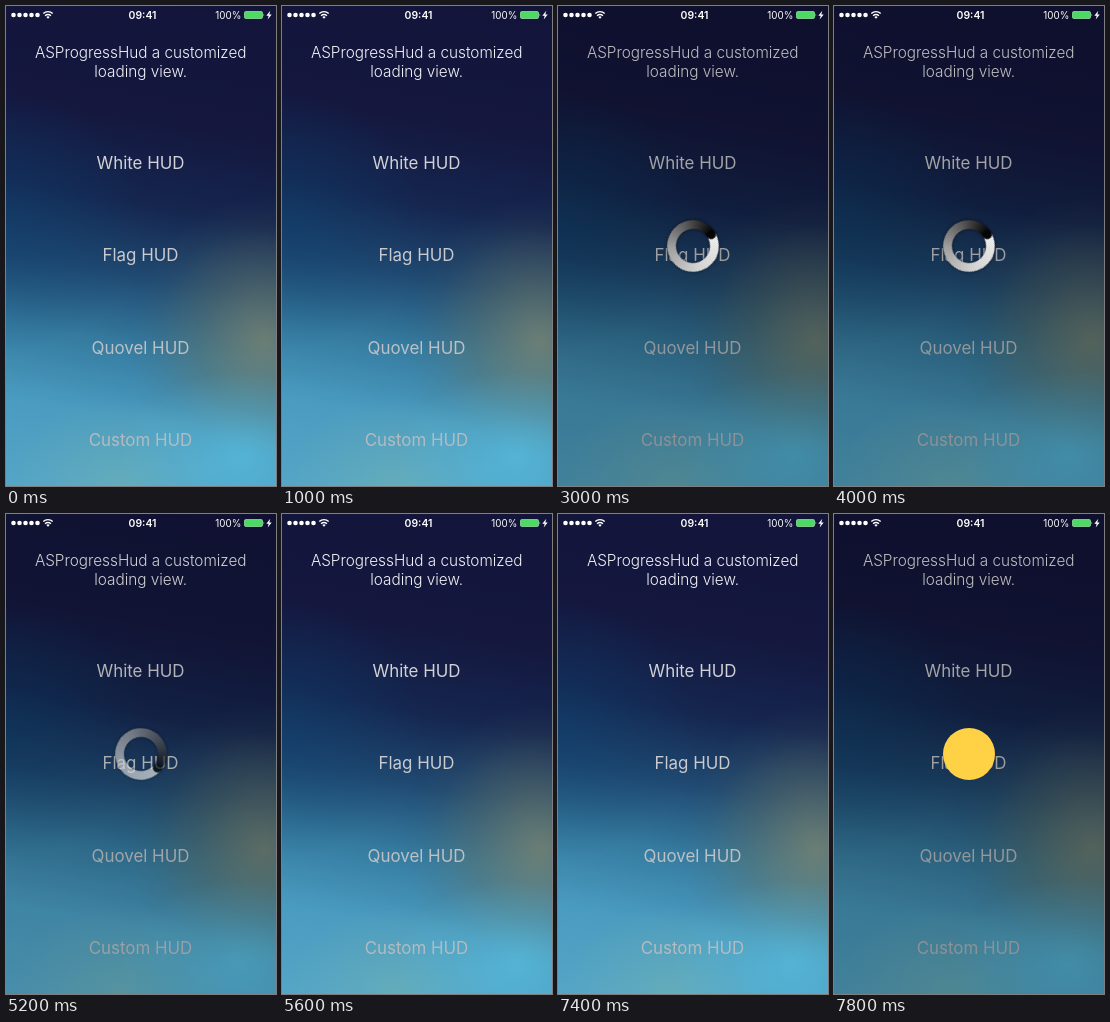
Animation of 270 by 480 pixels, one loop 8 s. Source, as an HTML page:

```html
<!DOCTYPE html>
<html lang="en">
<head>
<meta charset="utf-8">
<style>
  html, body { margin: 0; width: 270px; height: 480px; overflow: hidden; }
  body {
    position: relative;
    font-family: Inter, Roboto, sans-serif;
    background:
      radial-gradient(120px 85px at 235px 450px, rgba(88, 196, 232, .62), rgba(88, 190, 225, .3) 50%, transparent),
      radial-gradient(110px 85px at 115px 475px, rgba(125, 185, 175, .42), rgba(125, 185, 175, .2) 50%, transparent),
      radial-gradient(135px 145px at 258px 335px, rgba(128, 134, 108, .74), rgba(105, 118, 100, .4) 48%, rgba(90, 110, 100, .1) 80%, transparent),
      radial-gradient(140px 130px at 0 215px, rgba(12, 62, 108, .5), rgba(12, 62, 108, .25) 50%, transparent),
      linear-gradient(190deg, #13143a 0, #14173e 25%, #15264f 42%, #204a72 56%, #357a9f 69%, #4a9bc0 83%, #54a5c6);
  }
  svg, #dim { position: absolute; inset: 0; }
  #dim { background: rgba(0, 0, 0, .22); }
  .spinner { position: absolute; left: 109px; top: 214px; width: 52px; height: 52px; }
  #ring { filter: drop-shadow(0 0 1.5px rgba(0, 0, 0, .7)); }
  #ring i {
    position: absolute; inset: 0; border-radius: 50%;
    background: conic-gradient(#eee, #d4d4d4 30%, #a0a0a0 58%, #555 80%, #111 96%, #000);
    mask: radial-gradient(circle, transparent 16.5px, #000 17.5px);
    -webkit-mask: radial-gradient(circle, transparent 16.5px, #000 17.5px);
  }
  #ring b {
    position: absolute; left: 21.5px; top: 0; width: 9px; height: 9px;
    border-radius: 50%; background: #050505;
  }
  #disc { border-radius: 50%; background: #ffd246; }
</style>
</head>
<body>
<svg width="270" height="480" text-anchor="middle">
  <g font-size="15.3" font-weight="300" fill="#f4f4f8">
    <text x="134.7" y="52">ASProgressHud a customized</text>
    <text x="134.7" y="70.8">loading view.</text>
  </g>
  <g font-size="16.9">
    <text x="134.5" y="163" fill="#d2d2d6">White HUD</text>
    <text x="134.5" y="255" fill="#c8cacf">Flag HUD</text>
    <text x="134.5" y="347.5" fill="#bcc1c6">Quovel HUD</text>
    <text x="134.5" y="440" fill="#b4bbc0">Custom HUD</text>
  </g>
</svg>

<div id="dim"></div>
<div id="ring" class="spinner"><i></i><b></b></div>
<div id="disc" class="spinner"></div>

<svg width="270" height="480" fill="#fff">
  <path d="M7.5 9h25" stroke="#fff" stroke-width="4.6" stroke-linecap="round" stroke-dasharray="0 6"/>
  <path d="M37.3 7.6a6.6 6.6 0 0 1 9.4 0M39.1 9.7a4.1 4.1 0 0 1 5.8 0" fill="none" stroke="#fff" stroke-width="1.4"/>
  <path d="M42 12.8l-1.7-1.8a2.4 2.4 0 0 1 3.4 0z"/>
  <text x="136.5" y="12.8" font-size="10.4" font-weight="600" text-anchor="middle">09:41</text>
  <text x="235.3" y="12.8" font-size="9.8" text-anchor="end">100%</text>
  <rect x="238.5" y="5.5" width="18" height="7" rx="1.3" fill="#4cd964" stroke="#9be8a8" stroke-width=".7"/>
  <path d="M257.6 7.5q1.3 1.5 0 3z"/>
  <path d="M264.3 4.8l-4 5h2.4l-1 3.8 4-5h-2.4z"/>
</svg>

<script>
  const LOOP = 8000, STEP = 200, FADE = 300;
  const [dim, ring, disc] = ["dim", "ring", "disc"].map(id => document.getElementById(id));
  const clamp = v => Math.max(0, Math.min(1, v));
  const visible = (t, from, to) => clamp(Math.min(t - from, to - t) / FADE);

  function draw() {
    const t = Math.floor(performance.now() % LOOP / STEP) * STEP;
    const ringAlpha = visible(t, 1800, 5400);
    const discAlpha = visible(t, 7400, 9000);
    dim.style.opacity = Math.max(ringAlpha, discAlpha);
    ring.style.opacity = ringAlpha;
    ring.style.transform = `rotate(${57 + t * .36}deg)`;
    disc.style.opacity = discAlpha;
    requestAnimationFrame(draw);
  }
  draw();
</script>
</body>
</html>
```
